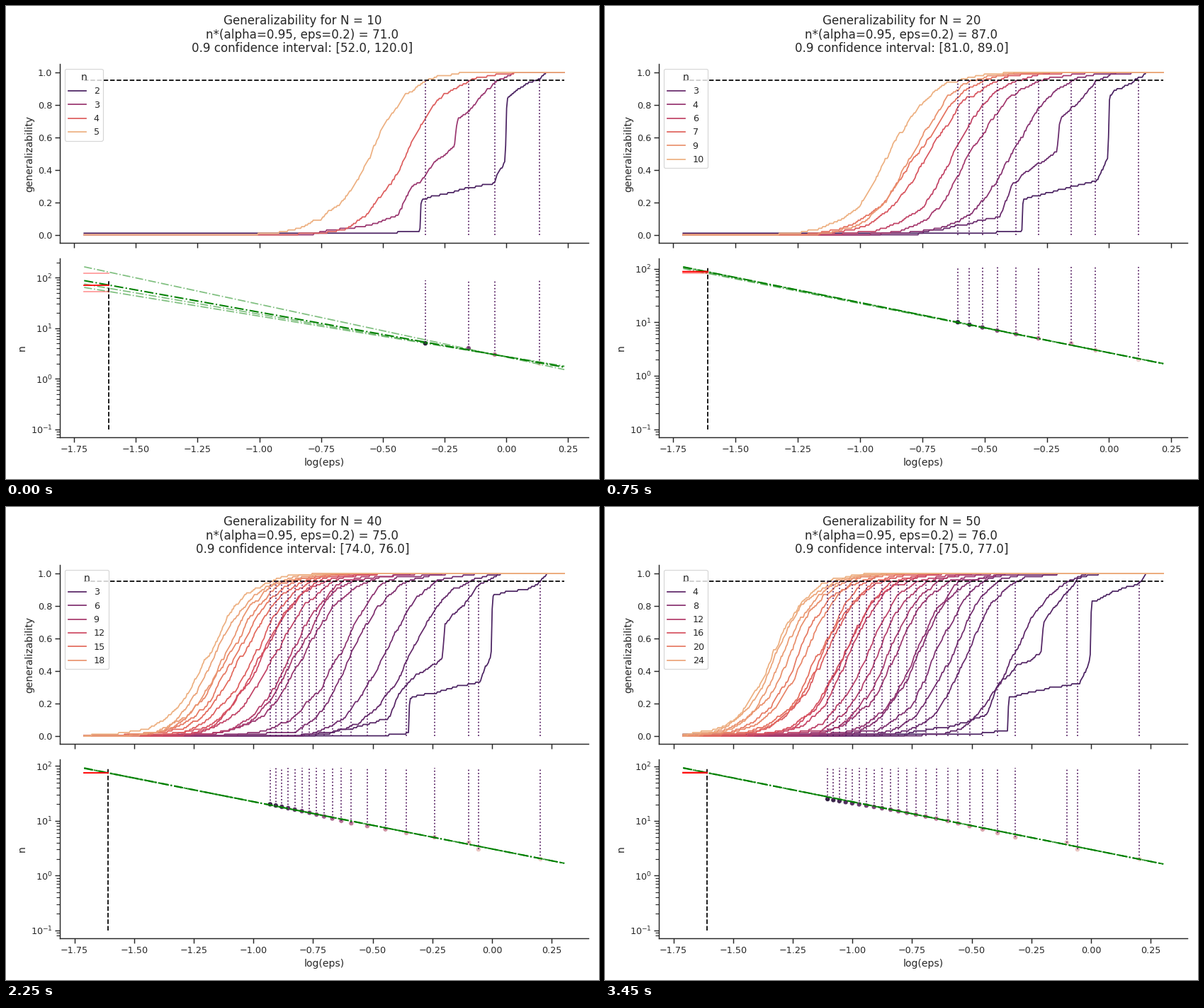
Write a matplotlib script that moves like this. It is 837 px wide and 669 px high and loops after 3.75 s.

```python
import numpy as np
import matplotlib.pyplot as plt
from matplotlib.animation import FuncAnimation
from matplotlib.colors import LinearSegmentedColormap
from matplotlib.lines import Line2D
from matplotlib.ticker import MultipleLocator

W, H, DPI = 837, 669, 96
K = 83.7 / DPI  # scales the usual point sizes to this stage
INK, DOTTED = "0.15", "#561e62"
LOG_EPS = np.log(0.2)
X0 = LOG_EPS - 0.1

plt.rcParams.update({
    "font.family": "DejaVu Sans", "font.size": 12 * K, "axes.labelsize": 12 * K,
    "xtick.labelsize": 11 * K, "ytick.labelsize": 11 * K,
    "legend.fontsize": 11 * K, "legend.title_fontsize": 12 * K,
    "text.color": INK, "axes.labelcolor": INK, "axes.edgecolor": INK,
    "xtick.color": INK, "ytick.color": INK,
    "axes.linewidth": 1.25 * K, "axes.labelpad": 4 * K,
    "axes.spines.top": False, "axes.spines.right": False,
    "lines.linewidth": 1.5 * K, "patch.linewidth": K,
    "xtick.major.size": 6 * K, "ytick.major.size": 6 * K,
    "xtick.major.width": 1.25 * K, "ytick.major.width": 1.25 * K,
    "ytick.minor.size": 4 * K, "ytick.minor.width": K,
    "xtick.major.pad": 3.5 * K, "ytick.major.pad": 3.5 * K,
})

FLARE = LinearSegmentedColormap.from_list("warm", [
    "#4b2362", "#6c2b6d", "#8f3371", "#b13c6c",
    "#d14a61", "#e3685c", "#e98d6b", "#edb081"])

# reach: log(eps) at which the curve of a few n gets to 0.95
# key: first value, step and count of the legend
# width: spread of the curves; end: fitted n at the right; top: largest n drawn
SCENES = [
    dict(size=10, best=71, low=52, high=120, width=0.085, end=1.685, top=163,
         key=(2, 1, 4), reach={2: 0.135, 3: -0.047, 4: -0.153, 5: -0.328}),
    dict(size=20, best=87, low=81, high=89, width=0.088, end=1.677, top=108.5,
         key=(3, 1.5, 6), reach={2: 0.118, 3: -0.054, 4: -0.152, 5: -0.284,
                                 7: -0.449, 10: -0.607}),
    dict(size=30, best=84, low=81, high=87, width=0.095, end=1.549, top=107.5,
         key=(2.5, 2.5, 6), reach={2: 0.203, 3: -0.044, 5: -0.225, 8: -0.523,
                                   12: -0.7, 15: -0.737}),
    dict(size=40, best=75, low=74, high=76, width=0.084, end=1.673, top=92.8,
         key=(3, 3, 6), reach={2: 0.203, 3: -0.057, 4: -0.097, 6: -0.359,
                               9: -0.59, 14: -0.765, 20: -0.93}),
    dict(size=50, best=76, low=75, high=77, width=0.077, end=1.624, top=93.2,
         key=(4, 4, 6), reach={2: 0.203, 3: -0.057, 4: -0.102, 5: -0.317,
                               10: -0.6, 16: -0.84, 25: -1.104}),
]


def dot_colour(t):
    """Cubehelix ramp from pale pink (0) to near black (1)."""
    x = 0.85 - 0.7 * t
    amp, phi = 0.4 * x * (1 - x), 0.8 * np.pi * x
    c, s = np.cos(phi), np.sin(phi)
    return (x + amp * (-0.14861 * c + 1.78277 * s),
            x + amp * (-0.29227 * c - 0.90649 * s),
            x + amp * 1.97294 * c)


def quantiles(p, n, reach, width):
    """log(eps) for each share p; small samples pile up at a few distances."""
    if n == 2:
        share = [0.01, 0.012, 0.03, 0.23, 0.32, 0.45, 0.83, 0.93, 0.95, 1]
        x = [X0 - 0.01, -0.48, -0.35, -0.345, -0.05, -0.004, 0.002,
             reach - 0.02, reach, reach + 0.03]
        return np.interp(p, share, x)
    if n == 3:
        share = [0.01, 0.08, 0.12, 0.28, 0.42, 0.5, 0.7, 0.82, 0.95, 1]
        x = [-0.78, -0.55, -0.44, -0.39, -0.29, -0.21, -0.197, -0.13,
             reach, reach + 0.1]
        return np.interp(p, share, x)
    logit = np.log(p / (1 - p))
    return reach + width * (logit - logit[94])


def staircase(grid, n, reach, width, rng):
    """Share of 100 half-random trials that lie below each grid value."""
    even = (np.arange(100) + 0.5) / 100
    p = 0.5 * even + 0.5 * np.sort(rng.random(100))
    x = quantiles(p, n, reach, width)
    return np.searchsorted(x, grid) / 100


fig = plt.figure(figsize=(W / DPI, H / DPI), dpi=DPI, facecolor="white")
box = lambda bottom: [76.4 / W, 1 - bottom / H, 745.6 / W, 252.7 / H]
top, low = fig.add_axes(box(335.1)), fig.add_axes(box(610.1))
title = fig.suptitle("", fontsize=14.4 * K, y=0.9815, linespacing=1.1)


def draw_curves(s, ns, reach, ends, hue):
    rng = np.random.default_rng(s["size"])
    grid = np.linspace(*ends, 500)
    for n, x in zip(ns, reach):
        top.plot(grid, staircase(grid, n, x, s["width"], rng), color=FLARE(hue(n)))
    top.plot(ends, [0.95, 0.95], "k--")
    for x in reach:
        top.plot([x, x], [0, 0.95], ":", color=DOTTED)
    top.set_ylim(-0.05, 1.05)
    top.tick_params(labelbottom=False)
    top.set_ylabel("generalizability")
    first, step, count = s["key"]
    values = [first + step * j for j in range(count)]
    top.legend([Line2D([], [], color=FLARE(min(hue(v), 1.0))) for v in values],
               [str(int(v)) for v in values], title="n", loc="upper left")


def draw_fit(s, ns, reach, ends, hue):
    # the fit runs through the best n at LOG_EPS
    rise = (s["best"] / s["end"]) ** (0.1 / (ends[1] - LOG_EPS))
    start = s["best"] * rise
    # all bands cross the fit at n = 3
    cross = np.log(start / 3) / np.log(start / s["end"])

    low.set_yscale("log")
    low.scatter(reach, ns, s=(6 * K) ** 2, c=[dot_colour(hue(n)) for n in ns],
                edgecolors="white", linewidths=0.48 * K)
    for x, n in zip(reach, ns):
        low.plot([x, x], [n, start], ":", color=DOTTED)
    for left in (s["top"], s["low"] * rise, np.sqrt(s["low"] * s["best"]) * rise):
        right = left * (3 / left) ** (1 / cross)
        low.plot(ends, [left, right], "-.", color="green", alpha=0.5)
    low.plot(ends, [start, s["end"]], "-.", color="green", linewidth=1.75 * K)
    low.plot([LOG_EPS, LOG_EPS], [0.1, start], "k--")
    for n, alpha in ((s["low"], 0.4), (s["high"], 0.4), (s["best"], 1)):
        low.plot([X0, LOG_EPS], [n, n], color="red", alpha=alpha)
    pad = (s["top"] / 0.1) ** 0.05
    low.set_ylim(0.1 / pad, s["top"] * pad)
    low.set_xlabel("log(eps)")
    low.set_ylabel("n")


def draw(i):
    s = SCENES[i]
    known = list(s["reach"])
    ns = np.arange(2, known[-1] + 1)
    reach = np.interp(np.log(ns), np.log(known), list(s["reach"].values()))
    ends = (X0, reach[0] + 0.1)
    margin = 0.05 * (ends[1] - X0)
    hue = lambda n: (n - 2) / (ns[-1] - 2)

    title.set_text(f"Generalizability for N = {s['size']}\n"
                   f"n*(alpha=0.95, eps=0.2) = {s['best']:.1f}\n"
                   f"0.9 confidence interval: [{s['low']:.1f}, {s['high']:.1f}]")
    for ax in (top, low):
        ax.clear()
        ax.set_xlim(X0 - margin, ends[1] + margin)
        ax.xaxis.set_major_locator(MultipleLocator(0.25))
    draw_curves(s, ns, reach, ends, hue)
    draw_fit(s, ns, reach, ends, hue)
    return []


anim = FuncAnimation(fig, draw, frames=len(SCENES), interval=750,
                     repeat=True, repeat_delay=0)
plt.show()
```
